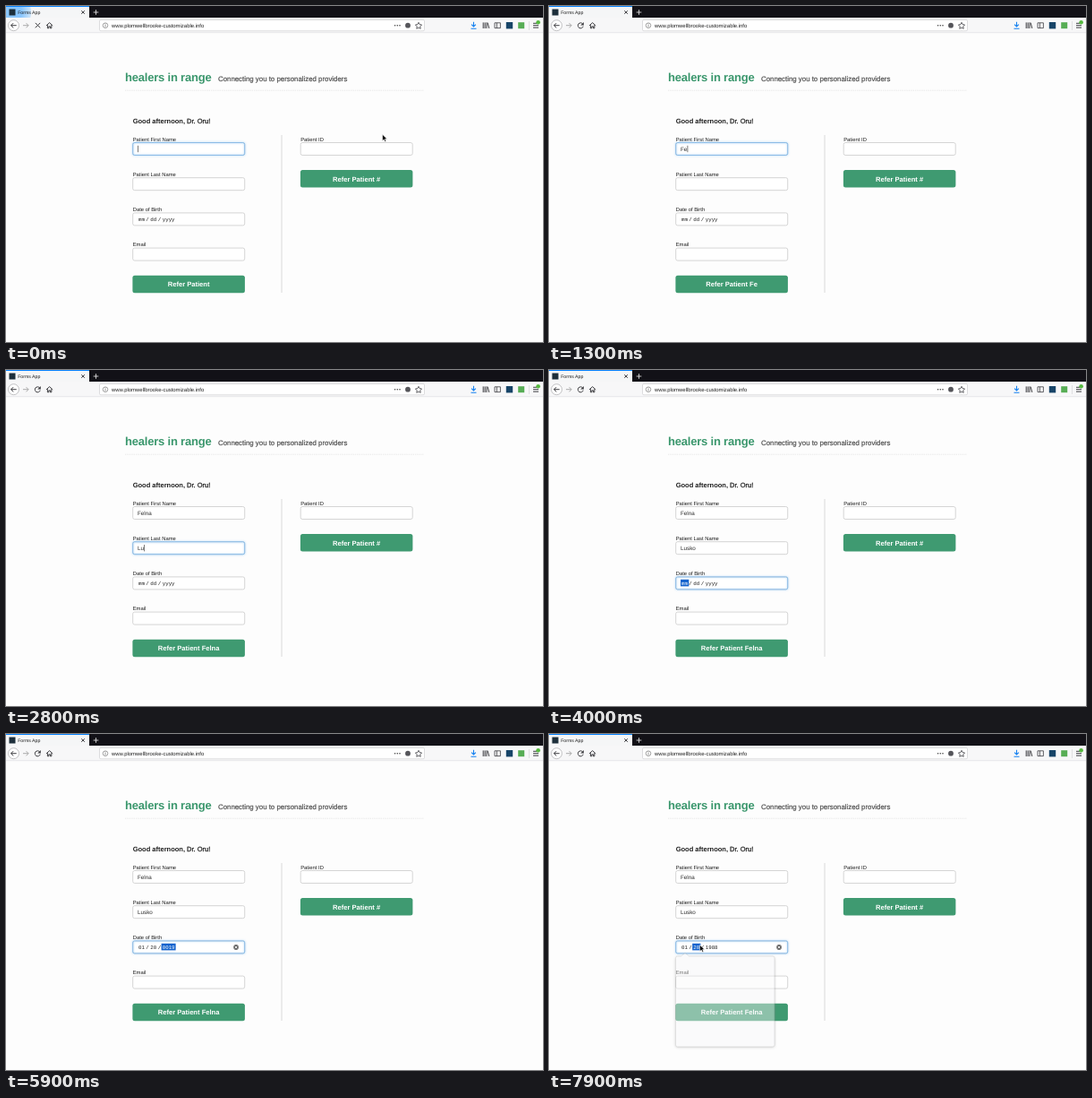
An HTML page that plays this animation: 600 px wide and 375 px high, repeating every 8000 ms.

```html
<!DOCTYPE html>
<html lang="en">
<head>
<meta charset="utf-8">
<title>Referral form</title>
<style>
  html, body { margin: 0; width: 100%; height: 100%; overflow: hidden; background: #fdfdfd; }
  svg { display: block; width: 600px; height: 375px; }
  text { font-family: "Liberation Sans", Arial, sans-serif; font-size: 5.85px; fill: #1c1c1c; text-rendering: geometricPrecision; white-space: pre; }
  .bold { font-weight: bold; }
  .heading { font-size: 13px; font-weight: bold; letter-spacing: -.2px; fill: #3b976d; }
  .tagline { font-size: 7.85px; fill: #505050; stroke: #505050; stroke-width: .2; }
  .greeting { font-size: 7.5px; }
  .medium { stroke: #1c1c1c; stroke-width: .25; }
  .mono { font-family: "Liberation Mono", monospace; font-size: 5.8px; }
  .typed { font-size: 6.3px; fill: #2c2c2c; }
  .button { font-size: 7.6px; font-weight: bold; fill: #fff; text-anchor: middle; }
  .icon { fill: none; stroke: #3c3c40; stroke-width: 1; }
</style>
</head>
<body>
<svg viewBox="0 0 600 375">
  <defs>
    <filter id="glow" x="-10%" y="-60%" width="120%" height="220%"><feGaussianBlur stdDeviation=".9"/></filter>
    <filter id="shadow" x="-10%" y="-10%" width="120%" height="120%"><feGaussianBlur stdDeviation="1.5"/></filter>
    <radialGradient id="burst"><stop offset=".5" stop-color="#66b6ff"/><stop offset="1" stop-color="#66b6ff" stop-opacity=".35"/></radialGradient>
    <clipPath id="tabClip"><path d="M0 1H93V13H0z"/></clipPath>
  </defs>
  <rect width="600" height="375" fill="#fdfdfd"/>

  <!-- Tab strip -->
  <path d="M0 0H600V13H0z" fill="#121117"/>
  <path d="M0 0H93V13H0z" fill="#f5f6f7"/>
  <g clip-path="url(#tabClip)"><circle id="load" cx="7" cy="7" fill="url(#burst)"/></g>
  <path d="M0 0H93V1H0z" fill="#0a84ff"/>
  <rect x="3.5" y="3.5" width="7" height="7" fill="#1d2f3b"/>
  <text x="13.2" y="9" style="font-size:5.2px">Forms App</text>
  <path class="icon" d="M84.3 5.2l3.6 3.6m0-3.6l-3.6 3.6"/>
  <path d="M97.7 7h5.6M100.5 4.2v5.6" stroke="#ddd" stroke-width=".9"/>

  <!-- Toolbar -->
  <path d="M0 13H600V30H0z" fill="#f7f7f8"/>
  <path d="M0 29.7H600" stroke="#dcdcdf" stroke-width=".6"/>
  <circle cx="8.5" cy="21.7" r="6" fill="#fff" stroke="#a9a9ad" stroke-width=".7"/>
  <path class="icon" d="M11.7 21.7H5.7m2.5-2.6L5.6 21.7l2.6 2.6"/>
  <path class="icon" d="M19 21.7h6m-2.5-2.6l2.6 2.6-2.6 2.6" style="stroke:#aaa"/>
  <path id="stop" class="icon" d="M32.8 18.9l5.4 5.4m0-5.4l-5.4 5.4"/>
  <g id="reload"><path class="icon" d="M37.7 20A3 3 0 1 0 38.2 22.7"/><path d="M38.8 17.9v3.5h-3.5z" fill="#3c3c40"/></g>
  <path class="icon" d="M45 21.9l3.6-3.3 3.6 3.3M46.4 21.2v3.6h1.4v-2h1.6v2h1.4v-3.6"/>
  <rect x="104.5" y="15.4" width="363" height="12.4" rx="1.5" fill="#fff" stroke="#cfcfd2" stroke-width=".7"/>
  <circle cx="111" cy="21.7" r="2.8" class="icon" style="stroke:#777;stroke-width:.7"/>
  <path d="M111 21.2v2.1M111 19.7v.8" stroke="#777" stroke-width=".8"/>
  <text x="118" y="23.9" style="font-size:5.95px">www.plomwellbrooke-customizable.info</text>
  <g fill="#444"><circle cx="434.6" cy="21.7" r=".8"/><circle cx="437.3" cy="21.7" r=".8"/><circle cx="440" cy="21.7" r=".8"/></g>
  <circle cx="449" cy="21.7" r="2.9" fill="#55555a"/>
  <path class="icon" stroke-linejoin="round" d="M461 18.3l1.1 2.3 2.5.4-1.8 1.8.4 2.5-2.2-1.2-2.2 1.2.4-2.5-1.8-1.8 2.5-.4z" style="stroke-width:.8"/>
  <path d="M522.5 17.8v5m-2.4-2.2l2.4 2.4 2.4-2.4M519.5 25.2h6" fill="none" stroke="#1581f0" stroke-width="1.1"/>
  <path class="icon" d="M533.2 18.4v6.6M535.1 18.4v6.6M537 18.4v6.6M538.1 18.6l1.7 6.3"/>
  <path class="icon" d="M546 18.8h6.4v5.8H546zM548.4 18.8v5.8" style="stroke-width:.8"/>
  <rect x="558.8" y="18" width="7.4" height="7.4" fill="#174468"/>
  <rect x="572.2" y="18.2" width="7" height="7" fill="#57ad55"/>
  <path d="M584.5 17v10" stroke="#d0d0d3" stroke-width=".6"/>
  <path class="icon" d="M589 19.3h6M589 21.7h6M589 24.1h6"/>
  <circle cx="594.6" cy="18.2" r="2.3" fill="#55b83f"/>

  <!-- Page -->
  <text x="133" y="83.7" class="heading">healers in range</text>
  <text x="237" y="83.8" class="tagline">Connecting you to personalized providers</text>
  <path d="M133 94.2H467" stroke="#dedede" stroke-width=".7" stroke-dasharray="1.4 1"/>
  <text x="141.7" y="130.6" class="greeting"><tspan class="bold">Good afternoon,</tspan><tspan class="medium"> Dr. Oru!</tspan></text>
  <path d="M308 144V320" stroke="#d9d9d9"/>
  <g id="form"></g>

  <rect id="focus" x="141.7" width="125" height="14" rx="2" fill="none" stroke="#8cc4f2" stroke-width="1.4" opacity=".6" filter="url(#glow)"/>
  <rect id="ring" x="141.7" width="125" height="14" rx="2" fill="none" stroke="#7fb8ea" stroke-width=".8"/>
  <text id="first" class="typed" x="147" y="161.8"></text>
  <text id="last" class="typed" x="147" y="201"></text>
  <path id="caret" stroke="#222" stroke-width=".6"/>
  <rect id="mark" y="233.8" height="7.6" fill="#1463cd"/>
  <g id="date"></g>
  <g id="clear"><circle cx="257" cy="238" r="2.9" fill="#6a6a6a"/><path d="M255.8 236.8l2.4 2.4m0-2.4l-2.4 2.4" stroke="#fff" stroke-width=".8"/></g>

  <g id="popup" opacity=".42">
    <rect x="141.5" y="249" width="110.5" height="100.5" rx="2" fill="#777" filter="url(#shadow)"/>
    <path d="M143.5 248H147.5L152 244.3 156.5 248H250a2 2 0 0 1 2 2V347a2 2 0 0 1-2 2H143.5a2 2 0 0 1-2-2V250a2 2 0 0 1 2-2z" fill="#f8f8f9" stroke="#a8a8a8" stroke-width=".7"/>
  </g>
  <path id="pointer" d="M0 0V7.2L1.7 5.7 2.9 8.2 4.1 7.6 3 5.2H5.2z" fill="#000" stroke="#fff" stroke-width=".6"/>
</svg>
<script>
const LOOP = 8000;
const $ = id => document.getElementById(id);
const show = (id, on) => $(id).setAttribute("visibility", on ? "visible" : "hidden");
const attrs = (id, values) => Object.entries(values).forEach(([k, v]) => $(id).setAttribute(k, v));

const field = (x, y, label) => `<text x="${x}" y="${y - 2}">${label}</text>
  <rect x="${x}" y="${y}" width="125" height="14" rx="2" fill="#fff" stroke="#cbcbcb" stroke-width=".8"/>`;
const button = (x, y, label, id) => `<rect x="${x}" y="${y}" width="125.5" height="19.6" rx="2.5" fill="#3f9a71"/>
  <text id="${id}" class="button" x="${x + 62.7}" y="${y + 12.6}">${label}</text>`;

const rows = [152.5, 191.7, 230.9, 270.1];
$("form").innerHTML =
  ["Patient First Name", "Patient Last Name", "Date of Birth", "Email"]
    .map((label, i) => field(141.7, rows[i], label)).join("") +
  button(141.4, 300.7, "Refer Patient", "refer") +
  field(329.2, rows[0], "Patient ID") +
  button(328.9, 182.9, "Refer Patient #", "referId");

const dateParts = [["month", 148], ["slash1", 156.3], ["day", 161.2], ["slash2", 169.8], ["year", 174.7]];
$("date").innerHTML = dateParts
  .map(([id, x]) => `<text id="${id}" class="mono" x="${x}" y="239.7">/</text>`).join("");
const marks = { month: [147, 9.3], day: [160.2, 9.2], year: [173.6, 16] };

// Key times
const firstKeys = [1000, 1200, 1500, 1700, 1900];
const lastKeys = [2500, 2700, 2900, 3100, 3300];
const toLast = 2300, toDate = 3700, click = 7800;
const steps = {
  month: [[0, "mm"], [4600, "01"]],
  day: [[0, "dd"], [5000, "02"], [5200, "20"]],
  year: [[0, "yyyy"], [5600, "0001"], [5800, "0019"], [6100, "0198"], [6300, "1988"]]
};

const typed = (word, keys, t) => word.slice(0, keys.filter(k => k <= t).length);
const valueAt = (list, t) => list.filter(([at]) => at <= t).pop()[1];
const ease = p => p * p * (3 - 2 * p);
const part = (t, a, b) => Math.min(1, Math.max(0, (t - a) / (b - a)));

function draw(t) {
  const first = typed("Felna", firstKeys, t);
  $("first").textContent = first;
  $("last").textContent = typed("Lusko", lastKeys, t);
  $("refer").textContent = first ? "Refer Patient " + first : "Refer Patient";

  const row = t < toLast ? 0 : t < toDate ? 1 : 2;
  attrs("focus", { y: rows[row] });
  attrs("ring", { y: rows[row] });

  const lastAction = [0, ...firstKeys, toLast, ...lastKeys].filter(k => k <= t).pop();
  const box = $(row ? "last" : "first");
  const x = 147.5 + (box.textContent ? box.getComputedTextLength() : 0);
  attrs("caret", { d: `M${x} ${rows[row] + 3.3}v7.4` });
  show("caret", row < 2 && (t - lastAction) % 1000 < 500);

  const active = t < toDate ? "" : t < 4600 ? "month" : t < 5200 || t >= click ? "day" : "year";
  show("mark", active);
  if (active) attrs("mark", { x: marks[active][0], width: marks[active][1] });
  for (const id in steps) {
    $(id).textContent = valueAt(steps[id], t);
    $(id).style.fill = id === active ? "#fff" : "#222";
  }
  show("clear", t >= 4600);

  show("stop", t < 100);
  show("reload", t >= 100);
  attrs("load", { r: 21 + t * .2, opacity: .75 * (1 - part(t, 50, 400)) });

  const move = ease(part(t, 6700, 7300)), settle = part(t, 7450, 7750);
  attrs("pointer", {
    transform: `translate(${420.6 - 250.4 * move - 1.6 * settle} ${143.3 + 91.2 * move + .9 * settle})`
  });
  show("pointer", t < firstKeys[0] || t >= 6700);
  show("popup", t >= 7850);
}

function tick(now) {
  draw(now % LOOP);
  requestAnimationFrame(tick);
}
draw(0);
requestAnimationFrame(tick);
</script>
</body>
</html>
```
